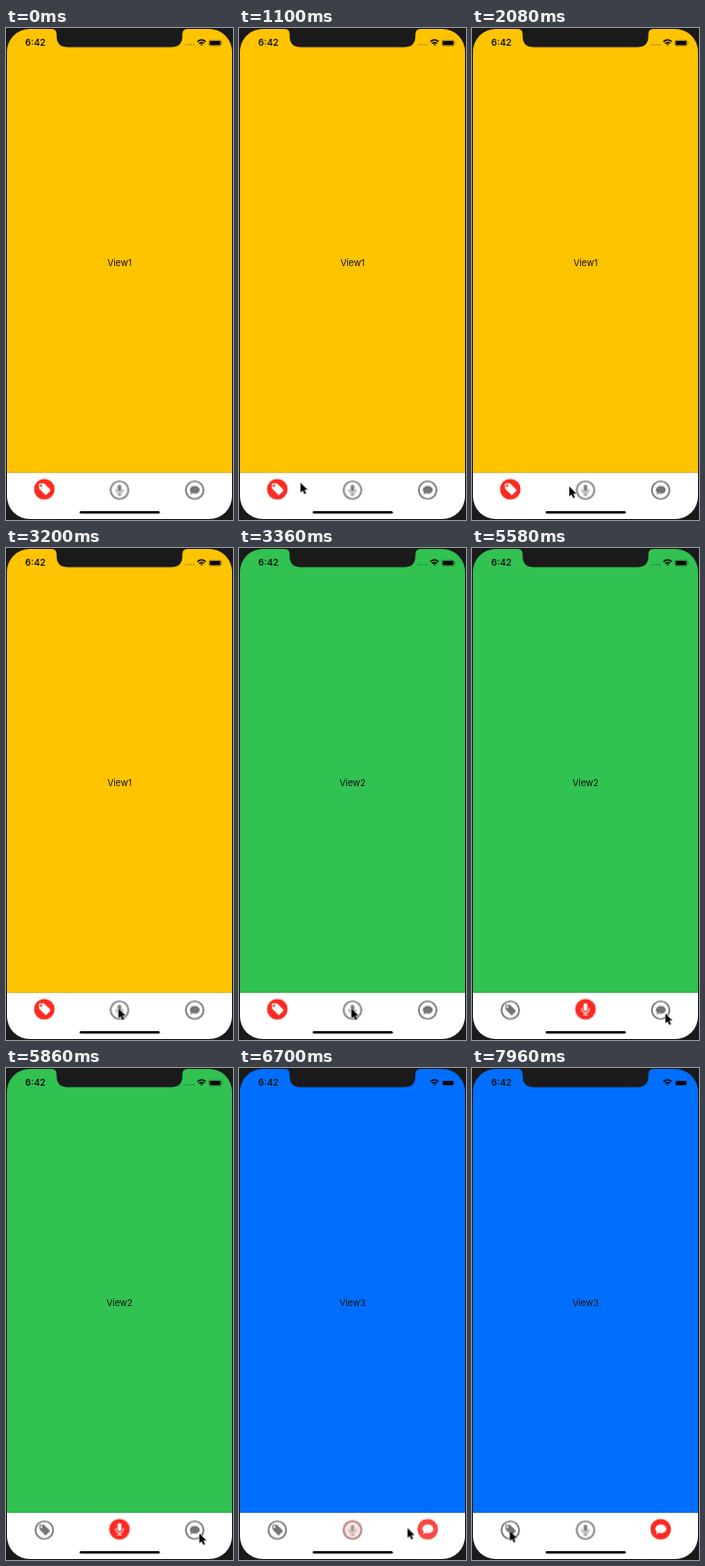
Animation, 231 px wide and 500 px high, one loop 8000 ms. Source, as an HTML page:

```html
<!DOCTYPE html>
<html lang="en">
<head>
<meta charset="utf-8">
<title>Tab bar</title>
<style>
  html, body { margin: 0; width: 100%; height: 100%; overflow: hidden; background: #1a1a1a; }
  svg { display: block; width: 231px; height: 500px; }
  text { font-family: Inter, Roboto, sans-serif; font-size: 9.2px; fill: #111; }
  .label { text-anchor: middle; letter-spacing: -.08px; }
  .time { font-weight: 600; }
</style>
</head>
<body>
<svg viewBox="0 0 231 500">
  <defs>
    <clipPath id="screen"><rect x="1" y="1" width="229" height="498" rx="23"/></clipPath>
    <path id="tag" fill-rule="evenodd" d="M-5.4-5.2Q-5.4-6-4.6-6H-1Q-.3-6 .2-5.5L6 .3Q6.7 1 6 1.7L2.2 5.5Q1.5 6.2 .8 5.5L-5-.3Q-5.4-.7-5.4-1.4ZM-3.3-4.9a1.2 1.2 0 1 0 .01 0Z"/>
    <g id="mic">
      <rect x="-1.9" y="-6.2" width="3.8" height="8" rx="1.9"/>
      <path d="M-3.8-1.2V0a3.8 3.8 0 0 0 7.6 0V-1.2M0 3.8V5.7M-2.2 5.8H2.2" fill="none" stroke="currentColor" stroke-width="1"/>
    </g>
    <path id="bubble" d="M.2-4.8C3.4-4.8 5.8-2.9 5.8-.4S3.4 4 .2 4Q-1.1 4-2.2 3.6Q-3.4 4.8-5 4.9Q-4 3.8-4 2.6Q-5.5 1.3-5.5-.4C-5.5-2.9-3-4.8 .2-4.8Z"/>
  </defs>

  <g clip-path="url(#screen)">
    <g id="views"></g>
    <rect y="452" width="231" height="48" fill="#fff"/>
    <rect y="451.7" width="231" height=".5" fill="#000" opacity=".3"/>
    <g id="tabs"></g>
    <rect x="75" y="491" width="81.5" height="2.6" rx="1.3" fill="#090909"/>
  </g>
  <path d="M46 0V1Q51.5 1 51.5 6V8Q51.5 19.5 63 19.5H168Q179.5 19.5 179.5 8V6Q179.5 1 185 1V0Z" fill="#1a1a1a"/>

  <text class="time" x="19.6" y="18.4">6:42</text>
  <g id="faint" fill="#000">
    <path d="M182.8 17.1H192" stroke="#000" stroke-opacity=".35" stroke-width="1.6" stroke-linecap="round" stroke-dasharray="0 2.7"/>
    <rect x="206.4" y="12.2" width="12.8" height="6" rx="1.7" fill="none" stroke="#000" stroke-opacity=".4" stroke-width=".6"/>
    <path d="M220 14.1q1.1 1.1 0 2.2Z" opacity=".45"/>
  </g>
  <g fill="none" stroke="#0a0a0a" stroke-width="1.4">
    <path d="M194.8 13.9Q199 10.2 203.2 13.9M196.5 15.7Q199 13.6 201.5 15.7"/>
    <path d="M197.7 16.7Q199 15.7 200.3 16.7L199 18.1Z" fill="#0a0a0a" stroke="none"/>
  </g>
  <rect x="207.2" y="13" width="11.2" height="4.4" rx="1" fill="#0a0a0a"/>

  <path id="cursor" d="M0 0V10L2.3 7.9L4 11.7L5.7 10.9L4.1 7.3H7.2Z" fill="#000" stroke="#fff" stroke-width=".8" paint-order="stroke"/>
</svg>
<script>
const LOOP = 8000, FADE = 700;
const TAPS = [0, 3360, 6100, LOOP];
const $ = id => document.getElementById(id);

// Each step is [time in ms, value].
function track(el, prop, steps) {
  const all = [[0, steps[0][1]], ...steps, [LOOP, steps[steps.length - 1][1]]];
  const frames = all.map(([t, value]) => ({ offset: t / LOOP, [prop]: value }));
  const animation = el.animate(frames, { duration: LOOP, iterations: Infinity });
  animation.startTime = start;
}

const start = document.timeline.currentTime || 0;

const tabs = [
  { color: '#ffc400', icon: 'tag', x: 39 },
  { color: '#31c251', icon: 'mic', x: 115.5 },
  { color: '#006fff', icon: 'bubble', x: 192 }
];

$('views').innerHTML = tabs.map(({ color }, i) => `<g>
  <rect width="231" height="453" fill="${color}"/>
  <text class="label" x="115.5" y="242.4">View${i + 1}</text></g>`).join('');

$('tabs').innerHTML = tabs.map(({ icon, x }) => `
  <g transform="translate(${x} 469.6)" fill="#757575" color="#757575">
    <circle r="9" fill="none" stroke="#757575" stroke-width="1.7"/>
    <use href="#${icon}" transform="scale(.9)"/>
  </g>
  <g transform="translate(${x} 468.7)" fill="#fff" color="#fff">
    <circle r="10.5" fill="#fc2a22"/><use href="#${icon}"/>
  </g>`).join('');

tabs.forEach((tab, i) => {
  const [from, to] = [TAPS[i], TAPS[i + 1]];
  const steps = (on, off, length) => [
    ...(from ? [[from, off], [from + length, on]] : [[0, on]]),
    ...(to < LOOP ? [[to, on], [to + length, off]] : [])
  ];
  const [idle, active] = [...$('tabs').children].slice(i * 2, i * 2 + 2);
  track($('views').children[i], 'opacity', steps(1, 0, 0));
  track(idle, 'opacity', steps(0, 1, FADE));
  track(active, 'opacity', steps(1, 0, FADE));
});

track($('faint'), 'opacity', [[TAPS[2], 1], [TAPS[2], 0]]);

const path = [
  [420, -8, 475], [780, 34, 470], [1140, 66, 461], [1380, 66, 461],
  [2080, 99, 466], [2220, 100, 466], [2920, 114.5, 468], [3500, 114.5, 468],
  [4080, 130.3, 468], [4180, 132, 468], [5020, 180, 469], [5560, 196.7, 473],
  [6100, 196.7, 473], [6680, 172, 467.5], [6720, 171, 467.5],
  [7440, 48, 469], [7540, 47, 469], [7940, 38.5, 470.5]
];
track($('cursor'), 'transform', path.map(([t, x, y]) => [t, `translate(${x}px, ${y}px)`]));
</script>
</body>
</html>
```
